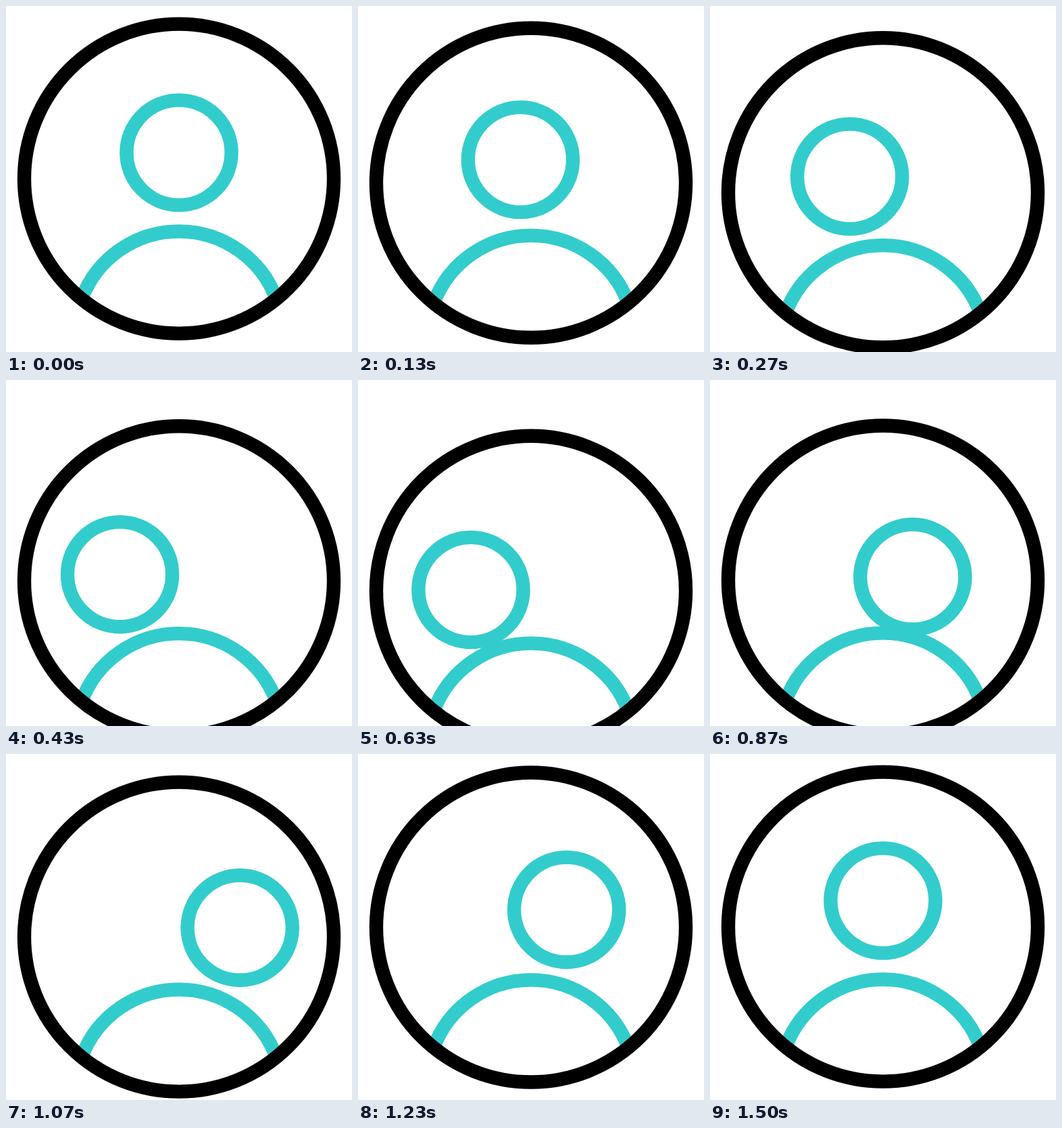
Animation of 512x512 px, one loop 2 s. Source, as an HTML page:

```html
<!DOCTYPE html>
<html lang="en">
<head>
<meta charset="utf-8">
<title>Avatar</title>
<style>
  html, body { margin: 0; width: 100%; height: 100%; overflow: hidden; background: #fff; }
  svg { display: block; width: 100%; height: 100%; fill: none; stroke: #3cc; stroke-width: 20.4; }
</style>
</head>
<body>
<svg viewBox="0 0 512 512">
  <circle id="head" cx="256" cy="217" r="77.6"/>
  <g id="body">
    <path d="M112 433.6A153.6 153.6 0 0 1 400 433.6"/>
    <circle cx="256" cy="255.6" r="229" stroke="#000"/>
  </g>
</svg>
<script>
  const LOOP = 2000, FPS = 30;
  const head = document.getElementById('head');
  const body = document.getElementById('body');

  // Tracks are [frame, value] keys, eased in and out between neighbours.
  const bodyY = [[0, 0], [19.5, 56.3], [38.4, 0]];
  const headY = [[0, 0], [19.17, 93.5], [42.6, 0]];
  const headX = [[0, 0], [15.5, -94], [17.8, -94], [30.2, 94], [45, 0]];

  function valueAt(keys, frame) {
    const next = keys.findIndex(([at]) => at > frame);
    if (next < 0) return keys[keys.length - 1][1];
    const [t0, v0] = keys[next - 1], [t1, v1] = keys[next];
    const u = (frame - t0) / (t1 - t0);
    return v0 + (v1 - v0) * u * u * (3 - 2 * u);
  }

  const move = (el, x, y) => el.setAttribute('transform', `translate(${x} ${y})`);

  function draw(ms) {
    const frame = Math.floor((ms % LOOP + 5) * FPS / 1000) % (LOOP * FPS / 1000);
    move(body, 0, valueAt(bodyY, frame));
    move(head, valueAt(headX, frame), valueAt(headY, frame));
  }

  const start = performance.now();
  function tick() {
    draw(performance.now() - start);
    requestAnimationFrame(tick);
  }
  tick();
</script>
</body>
</html>
```
